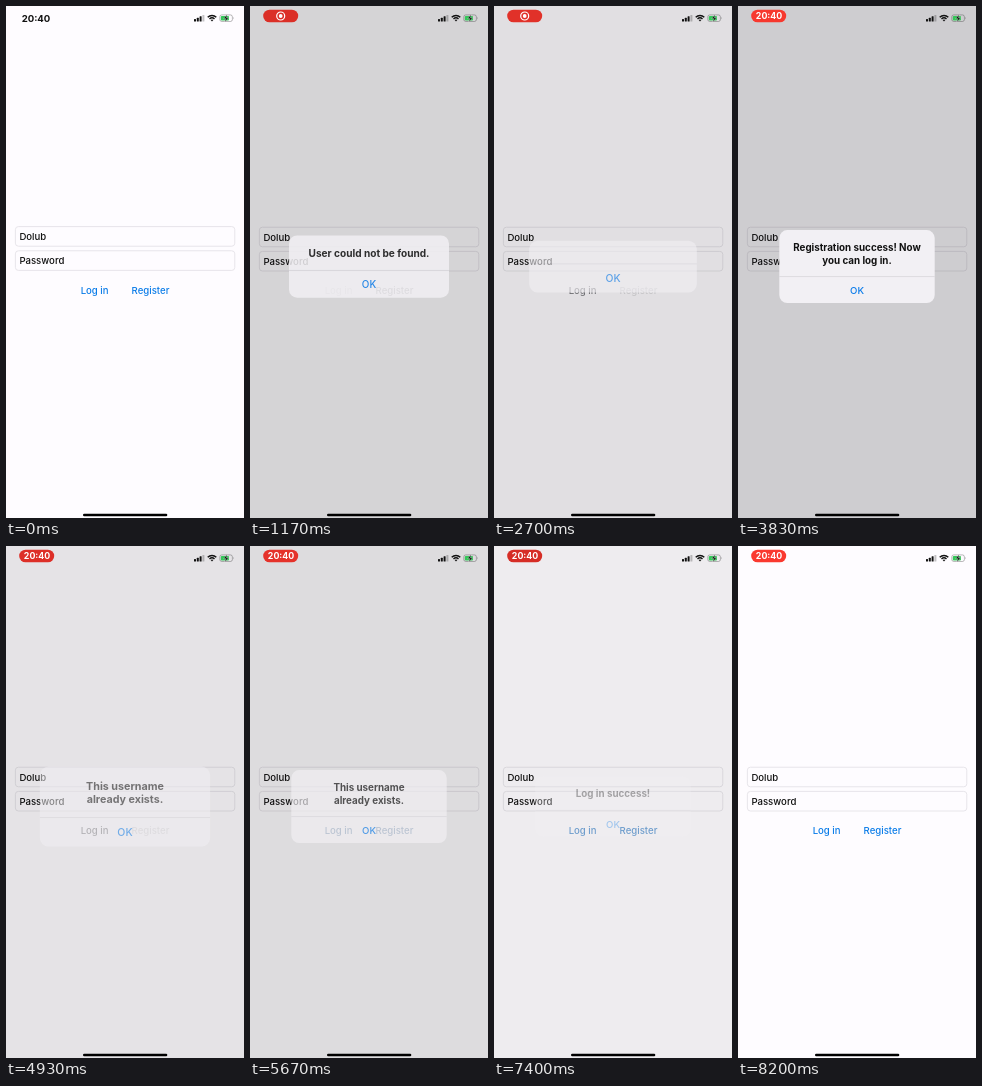
Animation of 238x512 px, one loop 8230 ms. Source, as an HTML page:

```html
<!DOCTYPE html>
<html lang="en">
<head>
<meta charset="utf-8">
<title>Log in</title>
<style>
  html, body { margin: 0; width: 100%; height: 100%; overflow: hidden; background: #fefcff; }
  svg { display: block; width: 238px; height: 512px; }
  text { font: 500 9.6px Inter, "Liberation Sans", sans-serif; fill: #111; }
  .mid { text-anchor: middle; }
  .field { fill: none; stroke: #e5e3e8; stroke-width: .9; }
  .title { font-size: 9.8px; font-weight: 650; }
  .ok { font-weight: 550; fill: #0a7bea; }
  #clock { font-size: 9.6px; font-weight: 700; }
  #pillClock { font-size: 8.8px; font-weight: 700; fill: #fff; }
</style>
</head>
<body>
<svg viewBox="0 0 238 512">
  <rect width="238" height="512" fill="#fefcff"/>
  <g id="form">
    <rect class="field" x="9.4" y="221.2" width="219.4" height="19.6" rx="3"/>
    <rect class="field" x="9.4" y="245.4" width="219.4" height="19.6" rx="3"/>
    <text x="13.4" y="234.5">Dolub</text>
    <text x="13.4" y="258.7">Password</text>
    <text class="mid" id="login" x="88.6" y="288.4">Log in</text>
    <text class="mid" id="register" x="144.5" y="288.4">Register</text>
  </g>
  <rect id="dim" width="238" height="512" fill="#040006"/>

  <g id="alert">
    <rect id="card" x="-77.7" width="155.4" rx="8" fill="#f2f0f4"/>
    <line id="rule" x1="-77.7" x2="77.7" stroke="#cfcdd2" stroke-width=".6"/>
    <text class="mid title"></text>
    <text class="mid title"></text>
    <text class="mid ok" id="ok">OK</text>
  </g>

  <text class="mid" id="clock" x="30" y="15.7">20:40</text>
  <g id="pill">
    <rect id="pillShape" x="13.2" y="3.7" width="35" height="12.6" rx="6.3"/>
    <g id="record" fill="none" stroke="#fff" stroke-width="1.2">
      <circle cx="30.7" cy="10" r="4"/>
      <circle cx="30.7" cy="10" r="1.9" fill="#fff" stroke="none"/>
    </g>
    <text class="mid" id="pillClock" x="31" y="13.2">20:40</text>
  </g>

  <g fill="#111">
    <rect x="188" y="12.9" width="2" height="2.6" rx=".5"/>
    <rect x="190.8" y="11.8" width="2" height="3.7" rx=".5"/>
    <rect x="193.6" y="10.3" width="2" height="5.2" rx=".5"/>
    <rect x="196.4" y="8.9" width="2" height="6.6" rx=".5" opacity=".25"/>
  </g>
  <g fill="none" stroke="#111" stroke-width="1.4">
    <path d="M201.7 11.2a6.2 6.2 0 0 1 8.6 0M203.5 13a3.6 3.6 0 0 1 5 0"/>
    <path d="M204.7 13.9L206 15.4L207.3 13.9Q206 13 204.7 13.9Z" fill="#111" stroke="none"/>
  </g>
  <rect x="213.8" y="8.9" width="12.6" height="6.6" rx="2" fill="none" stroke="#111" stroke-opacity=".4" stroke-width=".7"/>
  <rect x="214.8" y="9.9" width="8.2" height="4.6" rx="1" fill="#35c759"/>
  <path d="M227.2 11.1q1.1 1.1 0 2.2z" fill="#111" opacity=".45"/>
  <path d="M221.2 8.6L217.6 12.6H219.7L218.9 15.9L222.6 11.7H220.4Z" fill="#111" stroke="#fff" stroke-width=".3"/>
  <rect x="77" y="507.7" width="84.3" height="2.5" rx="1.25"/>
</svg>
<script>
const LOOP = 8230;
const PRESS = 200; // a button is held this long before its alert opens
const $ = id => document.getElementById(id);
const clamp = x => Math.min(1, Math.max(0, x));
const mix = (a, b, k) => `rgb(${a.map((v, i) => Math.round(v + (b[i] - v) * k))})`;
// critically damped spring from 0 to 1
const spring = ms => ms <= 0 ? 0 : 1 - (1 + ms * .0228) * Math.exp(-ms * .0228);

// fill: delay before the title arrives in the already opening alert
const alerts = [
  { button: 'login', at: 1022, off: 1850, fill: 0, lines: ['User could not be found.'] },
  { button: 'register', at: 2611, off: 4030, fill: 130, lines: ['Registration success! Now', 'you can log in.'] },
  { button: 'register', at: 4854, off: 5620, fill: 0, lines: ['This username', 'already exists.'] },
  { button: 'login', at: 6394, off: 7300, fill: 130, lines: ['Log in success!'] }
];
const titles = document.querySelectorAll('.title');

function drawAlert(lines, grow, alpha) {
  const ruleY = 21.5 + 12.5 * lines.length, height = ruleY + 26.5, top = -height / 2;
  $('alert').setAttribute('transform', `translate(119 260.6) scale(${1.2 - .2 * grow})`);
  $('alert').setAttribute('opacity', alpha);
  $('card').setAttribute('y', top);
  $('card').setAttribute('height', height);
  $('rule').setAttribute('y1', top + ruleY);
  $('rule').setAttribute('y2', top + ruleY);
  $('ok').setAttribute('y', top + ruleY + 17.2);
  titles.forEach((el, i) => {
    el.textContent = lines[i] || '';
    el.setAttribute('y', top + 20.9 + 12.5 * i);
  });
}

function drawStatus(t) {
  const glow = .5 + .5 * Math.cos((t - 4150) / 2150 * 2 * Math.PI);
  const shown = clamp((t - 30) / 250);
  const swap = clamp((t - 3000) / 300);
  $('clock').setAttribute('opacity', 1 - shown);
  $('pill').setAttribute('opacity', shown);
  $('pillShape').setAttribute('fill', mix([214, 45, 38], [255, 59, 48], glow));
  $('record').setAttribute('opacity', 1 - swap);
  $('pillClock').setAttribute('opacity', swap);
}

function draw(t) {
  const current = alerts.findLast(a => t >= a.at - PRESS) || alerts[0];
  const age = t - current.at;
  const grow = spring(age), stay = 1 - spring(t - current.off);
  const alpha = grow * stay;

  $('form').setAttribute('transform', `translate(0 ${t < 30 ? -.6 : 0})`);
  $('dim').setAttribute('opacity', .19 * alpha);
  drawAlert(age >= current.fill ? current.lines : [], grow, alpha);

  const tint = mix([10, 124, 232], [124, 124, 129], clamp(age / 60) * stay);
  const pressed = age < -PRESS ? 1 : .25 + .75 * clamp((age - 100) / 400);
  for (const id of ['login', 'register']) {
    $(id).style.fill = tint;
    $(id).setAttribute('opacity', id === current.button ? pressed : 1);
  }
  drawStatus(t);
}

const start = performance.now();
function tick() {
  draw((performance.now() - start) % LOOP);
  requestAnimationFrame(tick);
}
tick();
</script>
</body>
</html>
```
